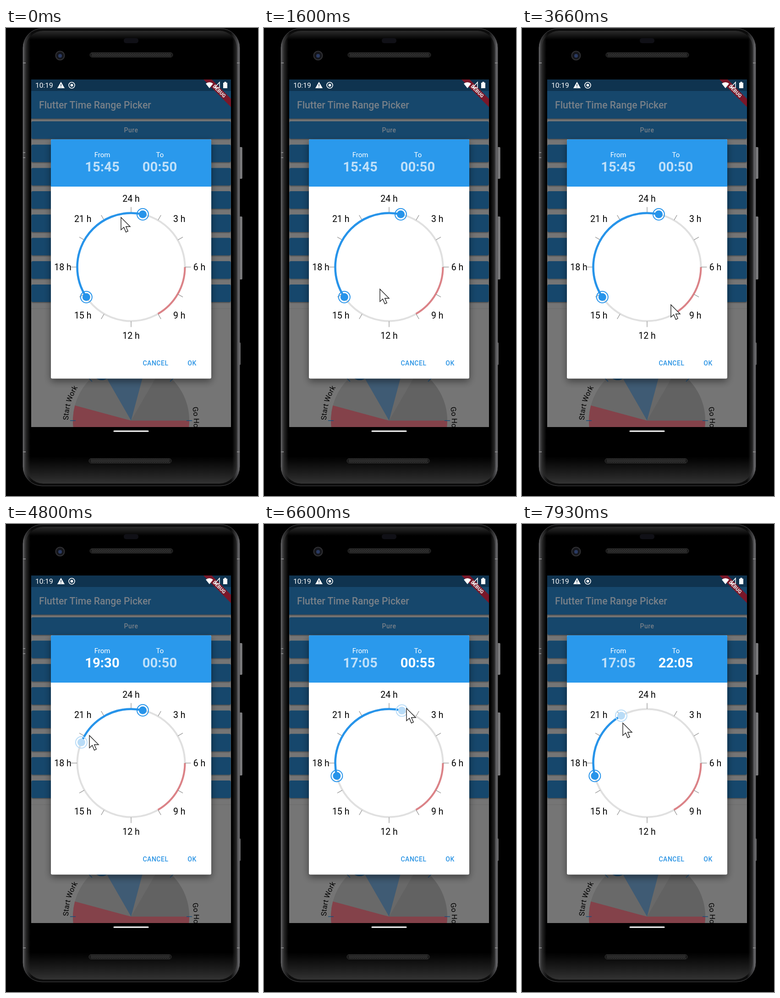
Animation, 550 px wide and 1018 px high, one loop 8 s. Source, as an HTML page:

```html
<!DOCTYPE html>
<html lang="en">
<head>
<meta charset="utf-8">
<title>Time range picker</title>
<style>
  html, body { margin: 0; width: 100%; height: 100%; overflow: hidden; background: #000; }
  svg { display: block; width: 550px; height: 1018px; font-family: Roboto, sans-serif; }
  .mid { text-anchor: middle; }
  .caps { font-size: 14px; font-weight: 500; letter-spacing: .5px; }
  .time { font-size: 29.3px; font-weight: 700; fill: #fff; }
  .ring { fill: none; stroke-width: 4; }
</style>
</head>
<body>
<svg viewBox="0 0 550 1018">
  <defs>
    <linearGradient id="shell">
      <stop offset="0" stop-color="#777779"/><stop offset=".008" stop-color="#3a3a3b"/>
      <stop offset=".04" stop-color="#0c0c0c"/><stop offset=".96" stop-color="#0c0c0c"/>
      <stop offset=".988" stop-color="#444446"/><stop offset="1" stop-color="#77777a"/>
    </linearGradient>
    <linearGradient id="glassX">
      <stop offset="0" stop-color="#2b2b2b"/><stop offset=".022" stop-color="#000"/>
      <stop offset=".978" stop-color="#000"/><stop offset="1" stop-color="#2b2b2b"/>
    </linearGradient>
    <linearGradient id="glassY" x2="0" y2="1">
      <stop offset="0" stop-color="#2c2c2c"/><stop offset=".02" stop-color="#2c2c2c" stop-opacity="0"/>
      <stop offset=".94" stop-color="#2c2c2c" stop-opacity="0"/><stop offset="1" stop-color="#333"/>
    </linearGradient>
    <linearGradient id="key">
      <stop offset="0" stop-color="#404042"/><stop offset=".6" stop-color="#8a8a8c"/><stop offset="1" stop-color="#5a5a5c"/>
    </linearGradient>
    <pattern id="mesh" width="4" height="4" patternUnits="userSpaceOnUse">
      <path d="M0 0L4 4M4 0L0 4" stroke="#444" stroke-width=".8"/>
    </pattern>
    <filter id="shadow" x="-10%" y="-10%" width="120%" height="120%">
      <feDropShadow dx="0" dy="6" stdDeviation="8" flood-opacity=".45"/>
    </filter>
    <filter id="lift" x="-5%" y="-20%" width="110%" height="150%">
      <feDropShadow dx="0" dy="1.5" stdDeviation="1.3" flood-opacity=".4"/>
    </filter>
    <clipPath id="screen"><path d="M55 112H491V868H55Z"/></clipPath>
    <path id="rim" d="M136 854A137 137 0 0 1 410 854A137 137 0 0 1 136 854"/>
  </defs>

  <!-- Phone -->
  <g fill="url(#key)">
    <rect x="508" y="259" width="8" height="69" rx="2"/>
    <rect x="508" y="410" width="8" height="137" rx="2"/>
    <rect x="508" y="684" width="4" height="49" rx="2"/>
  </g>
  <rect x="37" y="1" width="473" height="995" rx="42" fill="url(#shell)" stroke="#4b4b4d"/>
  <rect x="43" y="6" width="461" height="985" rx="38" fill="url(#glassX)"/>
  <rect x="43" y="6" width="461" height="985" rx="38" fill="url(#glassY)"/>
  <path d="M37 76h6M37 271h5M37 282h5M504 76h6M504 922h6M37 922h6" stroke="#858587" stroke-width="2"/>
  <rect x="257" y="22" width="32" height="11" rx="5" fill="#101016"/>
  <g fill="#181818" stroke="#363636">
    <rect x="183" y="53.5" width="181" height="10" rx="5"/>
    <rect x="181" y="936.5" width="180" height="10" rx="5"/>
  </g>
  <path d="M187 55H360V62H187ZM185 938H357V945H185Z" fill="url(#mesh)"/>
  <circle cx="118" cy="60" r="9.5" fill="#15161b" stroke="#323235" stroke-width="2"/>
  <circle cx="118" cy="60.500" r="4" fill="#2a3a62"/>
  <path d="M236 877H310" stroke="#fff" stroke-width="3" stroke-linecap="round"/>

  <!-- Dimmed page -->
  <g clip-path="url(#screen)">
    <path d="M55 112H491V868H55Z" fill="#757575"/>
    <path d="M55 137H491V197H55Z" fill="#15466c" filter="url(#lift)"/>
    <path d="M55 112H491V137H55Z" fill="#0f334f"/>
    <text x="72" y="175" font-size="21.2" font-weight="500" fill="#788088">Flutter Time Range Picker</text>
    <g id="buttons" fill="#15466c"></g>
    <text x="273" y="227" class="mid caps" fill="#788088">Pure</text>
    <path d="M55 610.500H491" stroke="#6b6b6b"/>
    <circle cx="273" cy="854" r="127" fill="#696969"/>
    <path d="M273 854L336.500 744A127 127 0 0 1 400 854Z" fill="#626262"/>
    <path d="M273 854L209.500 744A127 127 0 0 1 306 731.300Z" fill="#3f5b74"/>
    <path d="M273 854H400A127 127 0 1 1 150.300 821.100Z" fill="#84424a"/>
    <circle cx="209" cy="745" r="21" fill="#15466c"/>
    <path d="M140 854H152M394 854H406M181 762L188 769M358 769L365 762" stroke="#1d4f7a" stroke-width="1.500"/>
    <g font-size="16"><text><textPath href="#rim" startOffset="1">Start Work</textPath></text>
    <text><textPath href="#rim" startOffset="401">Go Home</textPath></text></g>
    <path d="M431 112H449L491 154V172Z" fill="#7a1729"/>
    <text class="mid" transform="translate(463 140) rotate(45)" font-size="10.800" font-weight="900" fill="#e4dfe0">DEBUG</text>
  </g>

  <!-- Status bar -->
  <g fill="#fff">
    <text x="64" y="130" font-size="15.500">10:19</text>
    <path d="M120 117L128 131H112Z"/>
    <path d="M120 122V126.500M120 128V129.500" stroke="#0f334f" stroke-width="1.500"/>
    <circle cx="143.500" cy="124.500" r="6.500" fill="none" stroke="#fff" stroke-width="1.600"/>
    <circle cx="143.500" cy="124.500" r="3"/>
    <path d="M436 121Q444 115 452 121L444 131Z"/>
    <path d="M466 118V130H455Z" fill="none" stroke="#fff" stroke-width="1.500"/>
    <path d="M474 119H476.500V117H480.500V119H483V131H474Z"/>
  </g>

  <!-- Dialog -->
  <g filter="url(#shadow)">
    <rect x="98" y="242" width="350" height="520.500" rx="3" fill="#fff"/>
    <path d="M98 345V245Q98 242 101 242H445Q448 242 448 245V345Z" fill="#2b99ec"/>
  </g>
  <g class="mid">
    <g fill="#fff" font-size="15"><text x="210" y="281">From</text><text x="336" y="281">To</text></g>
    <text id="fromText" class="time" x="210" y="312"></text>
    <text id="toText" class="time" x="335.500" y="312"></text>
    <g class="caps" fill="#2b94e4"><text x="326.500" y="734">CANCEL</text><text x="406" y="734">OK</text></g>
  </g>
  <g transform="translate(273 520)">
    <g class="ring" transform="rotate(-90)">
      <circle r="117.500" stroke="#e0e0e0"/>
      <circle r="117.500" stroke="#dc8287" pathLength="24" stroke-dasharray="4 20" stroke-dashoffset="-6"/>
      <g id="ticks" stroke="#8c8c8c" stroke-width="1.200"></g>
      <circle id="range" r="117.500" stroke="#2794ea" stroke-width="4.600" pathLength="24"/>
    </g>
    <g id="hours" class="mid" font-size="19.500"></g>
    <g id="fromKnob"><circle r="12.500" fill="none" stroke-width="2"/><circle r="8.500" stroke="none"/></g>
    <g id="toKnob"><circle r="12.500" fill="none" stroke-width="2"/><circle r="8.500" stroke="none"/></g>
  </g>
  <path id="cursor" d="M0 0V27L6.300 21.500L10.700 32L15.200 30L10.700 20H20Z" fill="#fff" stroke="#222" stroke-width="1.400"/>
</svg>
<script>
const $ = id => document.getElementById(id);
const LOOP = 8000, STEP = 200 / 3;

// Each key is [ms, value, ...].
const cursorKeys = [
  [0, 251, 412], [1300, 253, 568], [1700, 253, 568], [2400, 168, 580], [2700, 168, 580],
  [3500, 325, 602], [3750, 325, 602], [4250, 178, 588], [4500, 155, 525], [4800, 182, 460],
  [5000, 190, 450], [5600, 163, 545], [5800, 163, 545], [6400, 308, 405], [6600, 311, 401],
  [7200, 272, 405], [7930, 220, 433]
];
const fromKeys = [[4250, 15.75], [4800, 19.5], [5000, 20], [5600, 17 + 1 / 12]];
const toKeys = [[6400, 24 + 5 / 6], [6600, 24 + 11 / 12], [7200, 24], [7930, 22 + 1 / 12]];

function at(keys, t) {
  const i = keys.findIndex(k => k[0] > t);
  if (i === 0) return keys[0].slice(1);
  if (i < 0) return keys[keys.length - 1].slice(1);
  const a = keys[i - 1], b = keys[i], p = (t - a[0]) / (b[0] - a[0]);
  return a.slice(1).map((v, j) => v + (b[j + 1] - v) * p);
}

const polar = (hour, r) => {
  const a = hour * Math.PI / 12;
  return [r * Math.sin(a), -r * Math.cos(a)];
};
const pad = n => String(n).padStart(2, '0');
const snap = h => Math.round(h * 12) / 12;

function clock(hour) {
  const m = Math.round(hour * 60) % 1440;
  return pad(Math.floor(m / 60)) + ':' + pad(m % 60);
}

function build() {
  for (let i = 0; i < 8; i++)
    $('buttons').innerHTML += `<rect x="55.5" y="${203 + i * 50.7}" width="435" height="38" rx="3" filter="url(#lift)"/>`;
  for (let h = 0; h < 24; h += 2)
    $('ticks').innerHTML += `<path d="M118 0H130.500" transform="rotate(${h * 15})"/>`;
  for (let h = 3; h <= 24; h += 3) {
    const [x, y] = polar(h, 149);
    $('hours').innerHTML += `<text x="${x}" y="${y + 7}">${h} h</text>`;
  }
}

function showEnd(name, hour, active) {
  const colour = active ? '#b9dcf7' : '#2794ea', knob = $(name + 'Knob');
  knob.setAttribute('transform', `translate(${polar(hour, 117.5)})`);
  knob.setAttribute('fill', colour);
  knob.setAttribute('stroke', colour);
  $(name + 'Text').textContent = clock(hour);
  $(name + 'Text').setAttribute('opacity', active ? 1 : .7);
}

function draw(now) {
  const t = Math.floor((now % LOOP + 7) / STEP) * STEP;
  const from = snap(at(fromKeys, t)[0]), to = snap(at(toKeys, t)[0]), span = to - from;
  showEnd('from', from, t >= 4250 && t < 5700);
  showEnd('to', to, t >= 6400);
  $('range').setAttribute('stroke-dasharray', `${span} ${24 - span}`);
  $('range').setAttribute('stroke-dashoffset', -from);
  $('cursor').setAttribute('transform', `translate(${at(cursorKeys, t)})`);
  requestAnimationFrame(draw);
}

build();
draw(0);
</script>
</body>
</html>
```
